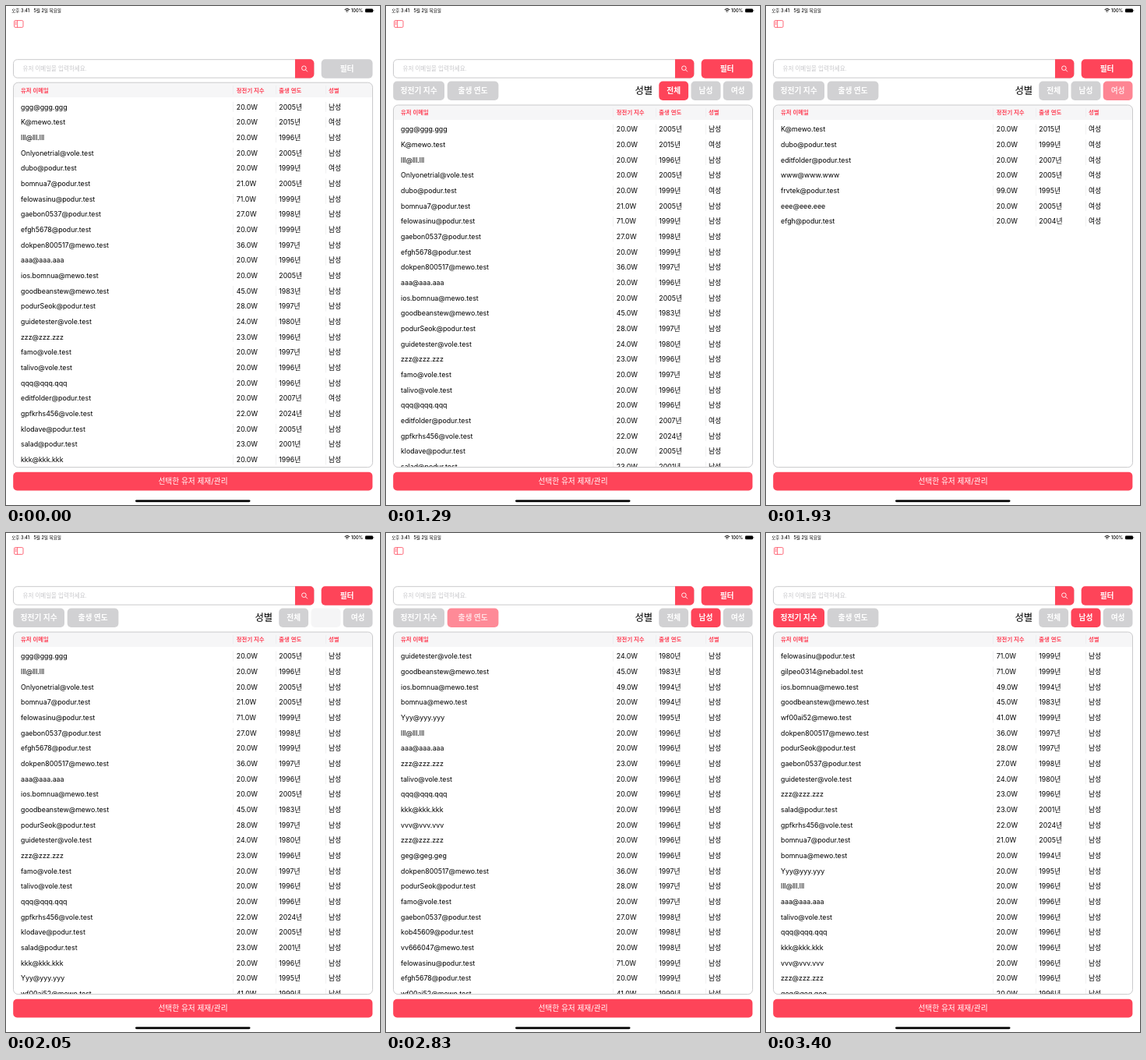
These frames come from a looping animation (480x640 px, 4490 ms). An HTML page:

```html
<!DOCTYPE html>
<html lang="ko">
<head>
<meta charset="utf-8">
<title>유저 관리</title>
<style>
  html, body { margin: 0; width: 100%; height: 100%; overflow: hidden; background: #fff; }
  svg { display: block; width: 100vw; height: 100vh; }
  text { font-family: Inter, "Noto Sans CJK KR", "Noto Sans CJK", sans-serif; white-space: pre; }
  .status { font-size: 5.6px; font-weight: 500; fill: #000; }
  .hint { font-size: 7.5px; fill: #c6c6c9; }
  .head { font-size: 7.4px; font-weight: 600; fill: #fe4459; }
  .row { font-size: 8.8px; fill: #000; }
  .label { font-size: 9.7px; font-weight: 600; fill: #fff; text-anchor: middle; }
  .action { font-size: 9.7px; fill: #fff; text-anchor: middle; }
  .gender { font-size: 12.4px; font-weight: 500; fill: #000; }
  .red { fill: #fe4459; }
  .frame { fill: none; stroke: #cacacc; }
  .icon { fill: none; stroke: #fe4459; stroke-width: .8; }
  .rule { stroke: #ececee; stroke-width: .8; }
</style>
</head>
<body>
<svg id="stage" viewBox="0 0 480 640">
  <defs>
    <clipPath id="tableClip"><rect id="clipBox" x="9.5" width="461" rx="6"/></clipPath>
  </defs>

  <text class="status" x="7.2" y="7.8">오후 3:41</text>
  <text class="status" x="35.4" y="7.8">5월 2일 목요일</text>
  <g fill="none" stroke="#000" stroke-width="1">
    <path d="M434.6 4.7q3.2-2.8 6.4 0M435.9 6.1q1.9-1.6 3.8 0"/>
    <circle cx="437.8" cy="7.2" r=".3"/>
  </g>
  <text class="status" x="443" y="7.8">100%</text>
  <rect x="461" y="3.4" width="10" height="4.8" rx="1.3"/>
  <rect x="471.5" y="5" width=".7" height="1.6" rx=".3"/>

  <rect class="icon" x="10.6" y="18.6" width="11.4" height="8.8" rx="1.3"/>
  <path class="icon" d="M14.6 18.6v8.8M11.8 20.7h1.6M11.8 22.2h1.6M11.8 23.7h1.6"/>

  <rect class="frame" x="9.5" y="68.7" width="385.5" height="23.4" rx="5"/>
  <path class="red" d="M371 68.3h19.3a5 5 0 0 1 5 5v14.2a5 5 0 0 1-5 5H371z"/>
  <path d="M384.6 81.9l2.4 2.4" stroke="#fff" stroke-width=".9"/>
  <circle cx="382.4" cy="79.7" r="2.8" fill="none" stroke="#fff" stroke-width=".9"/>
  <text class="hint" x="21.5" y="83.1">유저 이메일을 입력하세요.</text>

  <g id="buttons"></g>
  <text id="gender" class="gender" x="319.4" y="113.4">성별</text>

  <g id="table" clip-path="url(#tableClip)"></g>
  <rect id="tableFrame" class="frame" x="9.5" width="461" rx="6"/>

  <rect class="red" x="9.2" y="597.8" width="461.2" height="23.6" rx="5"/>
  <text class="action" x="240" y="613.4">선택한 유저 제재/관리</text>
  <rect x="166" y="633.4" width="147.5" height="2.8" rx="1.4"/>
</svg>

<script>
const LOOP = 4490;
const RED = '#fe4459', GRAY = '#d1d1d3';
const ROW_PITCH = 19.67, TABLE_BOTTOM = 591.6;
const COLUMNS = [19, 295.8, 350.3, 414];
const RULES = [291.5, 346.5, 410.5];
const STEPS = [0, 880, 990, 1090, 1190, 1290, 1610, 1730, 1840, 1940, 2050, 2150, 2250,
  2350, 2450, 2610, 2720, 2830, 2950, 3070, 3170, 3280, 3400];

// email, static index, birth year; a trailing "F" marks women
const users = `
ggg@ggg.ggg 20 2005
K@mewo.test 20 2015 F
lll@lll.lll 20 1996
Onlyonetrial@vole.test 20 2005
dubo@podur.test 20 1999 F
bomnua7@podur.test 21 2005
felowasinu@podur.test 71 1999
gaebon0537@podur.test 27 1998
efgh5678@podur.test 20 1999
dokpen800517@mewo.test 36 1997
aaa@aaa.aaa 20 1996
ios.bomnua@mewo.test 20 2005
goodbeanstew@mewo.test 45 1983
podurSeok@podur.test 28 1997
guidetester@vole.test 24 1980
zzz@zzz.zzz 23 1996
famo@vole.test 20 1997
talivo@vole.test 20 1996
qqq@qqq.qqq 20 1996
editfolder@podur.test 20 2007 F
gpfkrhs456@vole.test 22 2024
klodave@podur.test 20 2005
salad@podur.test 23 2001
kkk@kkk.kkk 20 1996
www@www.www 20 2005 F
frvtek@podur.test 99 1995 F
eee@eee.eee 20 2005 F
efgh@podur.test 20 2004 F
Yyy@yyy.yyy 20 1995
wf00ai52@mewo.test 41 1999
ios.bomnua@mewo.test 49 1994
bomnua@mewo.test 20 1994
vvv@vvv.vvv 20 1996
zzz@zzz.zzz 20 1996
geg@geg.geg 20 1996
kob45609@podur.test 20 1998
vv666047@mewo.test 20 1998
gilpeo0314@nebadol.test 71 1999`.trim().split('\n').map(line => {
  const [email, power, year, mark] = line.split(' ');
  return { email, power: +power, year: +year, female: mark === 'F' };
});

const women = users.filter(u => u.female);
const men = users.filter(u => !u.female);
const byYear = [...men].sort((a, b) => a.year - b.year);
const byPower = [...byYear].sort((a, b) => b.power - a.power);

const views = [
  { from: 0, rows: users, top: 98.2 },
  { from: 880, rows: users, top: 127 },
  { from: 1610, rows: women, top: 127 },
  { from: 2050, rows: men, top: 127 },
  { from: 2610, rows: byYear, top: 127 },
  { from: 3070, rows: byPower, top: 127 },
];

const buttons = [
  { label: '필터', x: 404.7, y: 68.2, w: 65.8, on: 880, off: LOOP, always: true },
  { label: '정전기 지수', x: 9.2, y: 96.5, w: 65.8, on: 3070, off: LOOP },
  { label: '출생 연도', x: 78.7, y: 96.5, w: 65.7, on: 2610, off: 3070 },
  { label: '전체', x: 350.3, y: 96.5, w: 37.8, on: 880, off: 1610, instant: true },
  { label: '남성', x: 391.5, y: 96.5, w: 38, on: 2050, off: LOOP },
  { label: '여성', x: 432.7, y: 96.5, w: 37.8, on: 1610, off: 2050 },
];

const byId = id => document.getElementById(id);

function add(parent, tag, attrs, text) {
  const node = document.createElementNS('http://www.w3.org/2000/svg', tag);
  for (const key in attrs) node.setAttribute(key, attrs[key]);
  if (text) node.textContent = text;
  parent.append(node);
  return node;
}

for (const b of buttons) {
  b.group = add(byId('buttons'), 'g', {});
  b.box = add(b.group, 'rect', { x: b.x, y: b.y, width: b.w, height: 24.5, rx: 5 });
  b.text = add(b.group, 'text', { class: 'label', x: b.x + b.w / 2, y: b.y + 15.8 }, b.label);
}

function drawLine(table, cells, cls, y, ruleTop, ruleHeight) {
  cells.forEach((cell, i) => add(table, 'text', { class: cls, x: COLUMNS[i], y }, cell));
  for (const x of RULES) add(table, 'path', { class: 'rule', d: `M${x} ${ruleTop}v${ruleHeight}` });
}

function drawTable({ rows, top }) {
  const table = byId('table');
  table.replaceChildren();
  for (const id of ['clipBox', 'tableFrame']) {
    byId(id).setAttribute('y', top);
    byId(id).setAttribute('height', TABLE_BOTTOM - top);
  }
  add(table, 'rect', { x: 9.5, y: top, width: 461, height: 19, fill: '#f6f6f7' });
  drawLine(table, ['유저 이메일', '정전기 지수', '출생 연도', '성별'], 'head', top + 12.4, top + 4, 11);
  rows.slice(0, 24).forEach((u, i) => {
    const middle = top + 31.2 + i * ROW_PITCH;
    const cells = [u.email, u.power.toFixed(1) + 'W', u.year + '년', u.female ? '여성' : '남성'];
    drawLine(table, cells, 'row', middle + 3.2, middle - 6.5, 13);
  });
}

// A pressed button dims, then returns in its active colour.
function drawButton(b, time) {
  const active = time >= b.on && time < b.off;
  const age = time - b.on;
  const progress = active && !b.instant ? Math.min(1, age / 330) ** 1.6 : 1;
  b.group.setAttribute('visibility', b.always || time >= 880 ? 'visible' : 'hidden');
  b.group.setAttribute('opacity', 0.2 + 0.8 * progress);
  b.text.setAttribute('opacity', Math.sqrt(progress));
  b.box.setAttribute('fill', active && (b.instant || age > 0) ? RED : GRAY);
}

const start = performance.now();
let shownStep, shownView;

function animate() {
  const time = (performance.now() - start) % LOOP;
  const step = STEPS.findLast(s => s <= time);
  if (step !== shownStep) {
    shownStep = step;
    const view = views.findLast(v => v.from <= step);
    if (view !== shownView) drawTable(shownView = view);
    byId('gender').setAttribute('visibility', step >= 880 ? 'visible' : 'hidden');
    buttons.forEach(b => drawButton(b, step));
  }
  requestAnimationFrame(animate);
}
animate();
</script>
</body>
</html>
```
